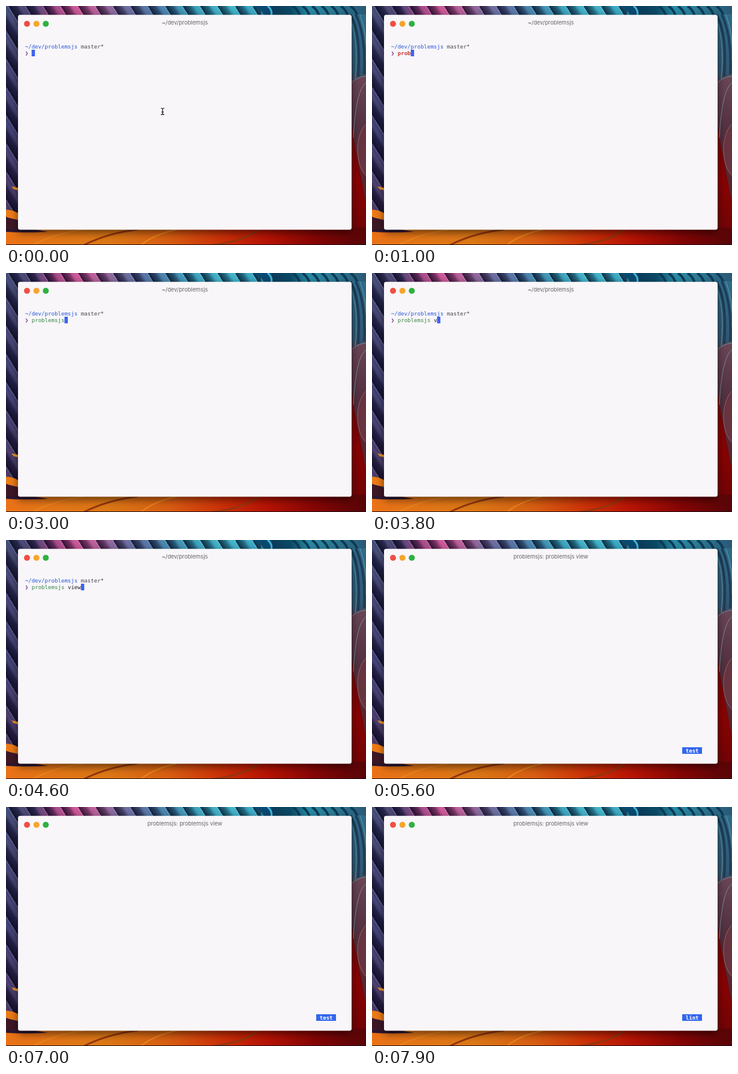
An HTML page that plays this animation: 600 px wide and 399 px high, repeating every 8000 ms.

```html
<!DOCTYPE html>
<html lang="en">
<head>
<meta charset="utf-8">
<title>Terminal</title>
<style>
  html, body { margin: 0; width: 100%; height: 100%; overflow: hidden; background: #1b1a3a; }
  svg { display: block; width: 600px; height: 399px; }
  text { white-space: pre; }
  .mono { font: 9.1px "DejaVu Sans Mono", monospace; }
  #title { font: 9.3px Inter, sans-serif; fill: #67656a; text-anchor: middle; }
  #window { filter: drop-shadow(0 5px 7px #0008); }
</style>
</head>
<body>
<svg viewBox="0 0 600 399">
  <defs id="defs">
    <linearGradient id="ridges" gradientUnits="userSpaceOnUse" x1="4" y1="0" x2="25" y2="-13" spreadMethod="repeat">
      <stop offset="0" stop-color="#060618" stop-opacity=".75"/>
      <stop offset=".45" stop-color="#060618" stop-opacity=".35"/>
      <stop offset=".85" stop-color="#fff" stop-opacity=".04"/>
      <stop offset="1" stop-color="#fff" stop-opacity=".2"/>
    </linearGradient>
  </defs>

  <g id="wallpaper">
    <rect width="600" height="399" fill="url(#left)"/>
    <rect width="600" height="20" fill="url(#top)"/>
    <rect width="425" height="399" fill="url(#ridges)"/>
    <path d="M410 0Q428 5 432 20H445Q447 8 441 0Z" fill="#0a4a70"/>
    <path d="M436 0Q446 8 441 20" fill="none" stroke="#45b4d6" stroke-width="3"/>
    <g id="fan" fill="none" stroke="#0d3b55" stroke-width="4"/>

    <rect x="570" y="14" width="30" height="385" fill="url(#right)"/>
    <g fill="none" stroke="#5f9db2">
      <path d="M574 14Q592 45 587 118M583 14Q600 50 597 114" stroke="#1d3d58" stroke-width="4"/>
      <path d="M570 16Q589 50 582 122M590 14Q603 50 600 90"/>
    </g>
    <path d="M574 128Q584 118 600 116V330L574 190Z" fill="url(#shell-shade)"/>
    <path d="M575 185Q580 250 600 335V399H575Z" fill="url(#ember)"/>
    <ellipse cx="611" cy="240" rx="25" ry="48" fill="#67343f" stroke="#92656c"/>
    <path d="M576 128Q586 118 600 117M579 220Q583 140 600 128" fill="none" stroke="#7c8b93"/>

    <rect y="370" width="600" height="29" fill="url(#bottom)"/>
    <path d="M0 370H30L70 377Q30 379 0 377Z" fill="#2c1632"/>
    <path d="M9 301L22 304V308L13 306Z" fill="#ee9224"/>
    <path d="M0 340Q12 340 22 347V357Q8 355 0 352Z" fill="#ec7a16"/>
    <path d="M0 353Q12 355 22 359V373H0Z" fill="#3d1726"/>
    <g fill="none">
      <path d="M45 399Q80 380 130 373M225 399Q245 382 285 373" stroke="#e8871d" stroke-width="2"/>
      <path d="M130 399Q170 379 220 373M345 399Q400 392 420 373" stroke="#93370f" stroke-width="3"/>
    </g>
    <path d="M0 398.5H600" stroke="#1b1018"/>
  </g>

  <rect id="window" x="20" y="14.7" width="556" height="358.8" rx="3.5" fill="#f8f6f9"/>
  <circle cx="35" cy="29.7" r="5" fill="#ef4f43"/>
  <circle cx="50.7" cy="29.7" r="5" fill="#f6a52c"/>
  <circle cx="66.3" cy="29.7" r="5" fill="#2eb140"/>
  <text id="title" x="298" y="31"></text>

  <g id="shell" class="mono">
    <text x="31.7" y="71"><tspan fill="#2857d8">~/dev/problemsjs</tspan><tspan fill="#48464c"> master*</tspan></text>
    <text x="31.7" y="82" fill="#762c86">❯</text>
    <text x="42.7" y="82"><tspan id="command"></tspan><tspan id="args" fill="#222"></tspan></text>
    <rect id="cursor" y="73" width="5.5" height="11" fill="#3c63ee"/>
  </g>
  <path id="pointer" d="M258 170.5Q260.5 170.5 261 172Q261.5 170.5 264 170.5M261 172V180M258 181.5Q260.5 181.5 261 180Q261.5 181.5 264 181.5M259 177H263" fill="none" stroke="#111" stroke-width="1.2"/>

  <g id="viewer" class="mono">
    <rect x="517" y="346" width="33" height="11" fill="#3266ee"/>
    <text id="tab" x="522.7" y="354.5" fill="#fff" font-weight="700"></text>
  </g>
</svg>
<script>
const $ = id => document.getElementById(id);
const LOOP = 8000, CELL = 5.48;

function add(parent, tag, attrs) {
  const el = document.createElementNS("http://www.w3.org/2000/svg", tag);
  for (const key in attrs) el.setAttribute(key, attrs[key]);
  return parent.appendChild(el);
}

function gradient(id, vertical, stops) {
  const g = add($("defs"), "linearGradient", { id, x2: vertical ? 0 : 1, y2: vertical ? 1 : 0 });
  stops.split(" ").forEach(s => {
    const [color, offset] = s.split("@");
    add(g, "stop", { "stop-color": color, offset: offset + "%" });
  });
}

gradient("top", false, "#34406e@0 #47386f@8 #9d3d82@13 #cf4c94@19 #b75696@25 #74639b@31 #5268a0@37 #3d80ad@44 #2f9fbd@52 #35b5cd@61 #2ba4c4@70 #0b3c5a@74 #0b4a66@79 #288ba6@84 #2c7d98@90 #2a5875@100");
gradient("left", true, "#39406e@0 #38366a@25 #33326a@50 #3d2f62@75 #3b254e@100");
gradient("right", true, "#2f6c8a@0 #33566f@25 #5a3646@32 #700a10@60 #780303@80 #5c060a@100");
gradient("shell-shade", true, "#6a4656@0 #523040@45 #5c2028@100");
gradient("ember", true, "#780404@0 #8a0303@50 #6a0406@100");
gradient("bottom", false, "#ea7217@0 #dc7816@28 #d85e12@45 #cc3008@60 #b81404@72 #850505@86 #560508@100");

for (let x = 478; x < 575; x += 16)
  add($("fan"), "path", { d: `M${x} 0Q${x + 9} 6 ${x + 12} 17` });

// Number of characters typed so far
const typed = (t, start, step, max) =>
  Math.max(0, Math.min(max, Math.floor((t - start) / step) + 1));

function draw(t) {
  const running = t >= 5100;
  const name = "problemsjs".slice(0, typed(t, 600, 130, 10));
  const args = " view".slice(0, typed(t, 3500, 180, 5));
  const known = name.length === 10;

  $("title").textContent = running ? "problemsjs: problemsjs view" : "~/dev/problemsjs";
  $("shell").style.display = running ? "none" : "";
  $("viewer").style.display = running ? "" : "none";
  $("pointer").style.display = name ? "none" : "";

  $("command").textContent = name;
  $("command").setAttribute("fill", known ? "#398545" : "#c23c35");
  $("command").setAttribute("font-weight", known ? 400 : 700);
  $("args").textContent = args;
  $("cursor").setAttribute("x", 42.7 + CELL * (name + args).length);
  $("tab").textContent = t < 7500 ? "test" : "lint";
}

const begin = performance.now();
function tick() {
  draw((performance.now() - begin) % LOOP);
  requestAnimationFrame(tick);
}
tick();
</script>
</body>
</html>
```
